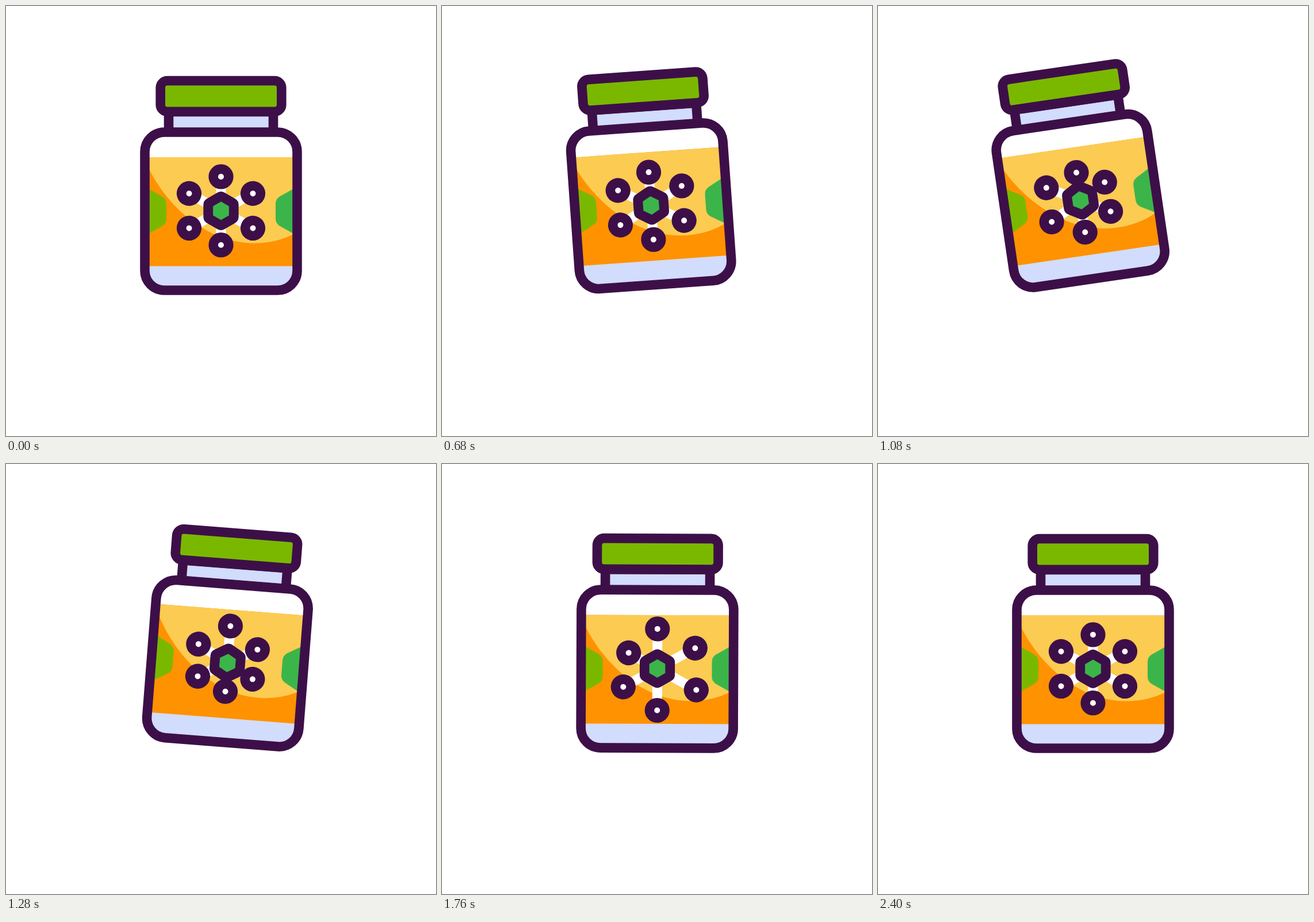
An HTML page that plays this animation: 748 px wide and 748 px high, repeating every 3000 ms.

```html
<!DOCTYPE html>
<html lang="en">
<head>
<meta charset="utf-8">
<title>Rocking jar</title>
<style>
  html, body { margin: 0; height: 100%; overflow: hidden; background: #fff; }
  svg { display: block; width: 100%; height: 100%; }
  .ink { stroke: #3d0f48; stroke-width: 16.6; }
</style>
</head>
<body>
<svg viewBox="0 0 748 748">
  <defs>
    <rect id="body" x="241.5" y="219.5" width="265" height="275" rx="34"/>
    <path id="side" d="M241 314L272 331.5Q279 336 279 344V370Q279 378 272 382.5L241 400Z"/>
    <path id="hexagon" d="M0-16L13.86-8V8L0 16L-13.86 8V-8Z"/>
    <clipPath id="inside"><use href="#body"/></clipPath>
  </defs>
  <g id="jar">
    <path class="ink" fill="#d2dcfc" d="M283 184V220H465V184Z"/>
    <rect class="ink" fill="#7ab800" x="268.7" y="130" width="210.6" height="53.7" rx="12"/>
    <g clip-path="url(#inside)">
      <path fill="#fff" d="M241 219H507V264H241Z"/>
      <path fill="#d2dcfc" d="M241 452H507V495H241Z"/>
      <path fill="#ff9200" d="M241 263.5H507V452.5H241Z"/>
      <path fill="#fccb52" d="M241 263.5V268L250 286C283 350 350 412.5 432 412.5Q468 412.5 498 398L507 393V263.5Z"/>
      <use href="#side" fill="#7ab800"/>
      <use href="#side" fill="#3bb54a" transform="matrix(-1 0 0 1 748 0)"/>
    </g>
    <use href="#body" class="ink" fill="none"/>
    <g transform="translate(374 356.3)">
      <g id="spokes" stroke="#fff" stroke-width="17"></g>
      <g id="dots" class="ink" fill="#fff"></g>
      <use href="#hexagon" fill="#3d0f48" stroke="#3d0f48" stroke-width="18" stroke-linejoin="round" transform="scale(1.34)"/>
      <use href="#hexagon" fill="#3bb54a"/>
    </g>
  </g>
</svg>
<script>
const LOOP = 3000, STEP = 40, ARMS = 6;
const byId = id => document.getElementById(id);

// Keys are [time, value] pairs joined by smooth ease-in-out.
function ease(keys, t) {
  if (t <= keys[0][0]) return keys[0][1];
  for (let i = 1; i < keys.length; i++) {
    const [t0, v0] = keys[i - 1], [t1, v1] = keys[i];
    if (t < t1) {
      const p = (t - t0) / (t1 - t0);
      return v0 + (v1 - v0) * p * p * (3 - 2 * p);
    }
  }
  return keys.at(-1)[1];
}

function add(parent, tag, attrs) {
  const el = document.createElementNS('http://www.w3.org/2000/svg', tag);
  for (const name in attrs) el.setAttribute(name, attrs[name]);
  return parent.appendChild(el);
}

const tilt = [[500, 0], [960, -12], [1405, 8.4], [1625, -2.5], [1820, 1], [2000, 0]];

// Each arm pulls in, then pushes out, a little later and further than the one before.
const arms = Array.from({ length: ARMS }, (_, i) => {
  const turn = 2 * Math.PI * i / ARMS;
  const rest = 61.9 - 2.5 * Math.cos(2 * turn);
  const transform = `rotate(${360 * i / ARMS + 1.7 * Math.sin(2 * turn)})`;
  return {
    line: add(byId('spokes'), 'line', { transform }),
    dot: add(byId('dots'), 'circle', { transform, r: 13.3 }),
    keys: [
      [580 + 105 * i, rest],
      [1040 + 120 * i, rest - 11.3],
      [1430 + 140 * i, rest + 13 + 0.35 * i * i],
      [2400, rest]
    ]
  };
});

function draw(now) {
  const t = Math.floor(now % LOOP / STEP) * STEP;
  const angle = ease(tilt, t);
  // The jar rocks on whichever bottom corner it leans towards.
  byId('jar').setAttribute('transform', `rotate(${angle} ${angle < 0 ? 238 : 510} 497)`);
  for (const { line, dot, keys } of arms) {
    const y = -ease(keys, t);
    line.setAttribute('y2', y);
    dot.setAttribute('cy', y);
  }
}

const begin = performance.now();
function tick() {
  draw(performance.now() - begin);
  requestAnimationFrame(tick);
}
tick();
</script>
</body>
</html>
```
